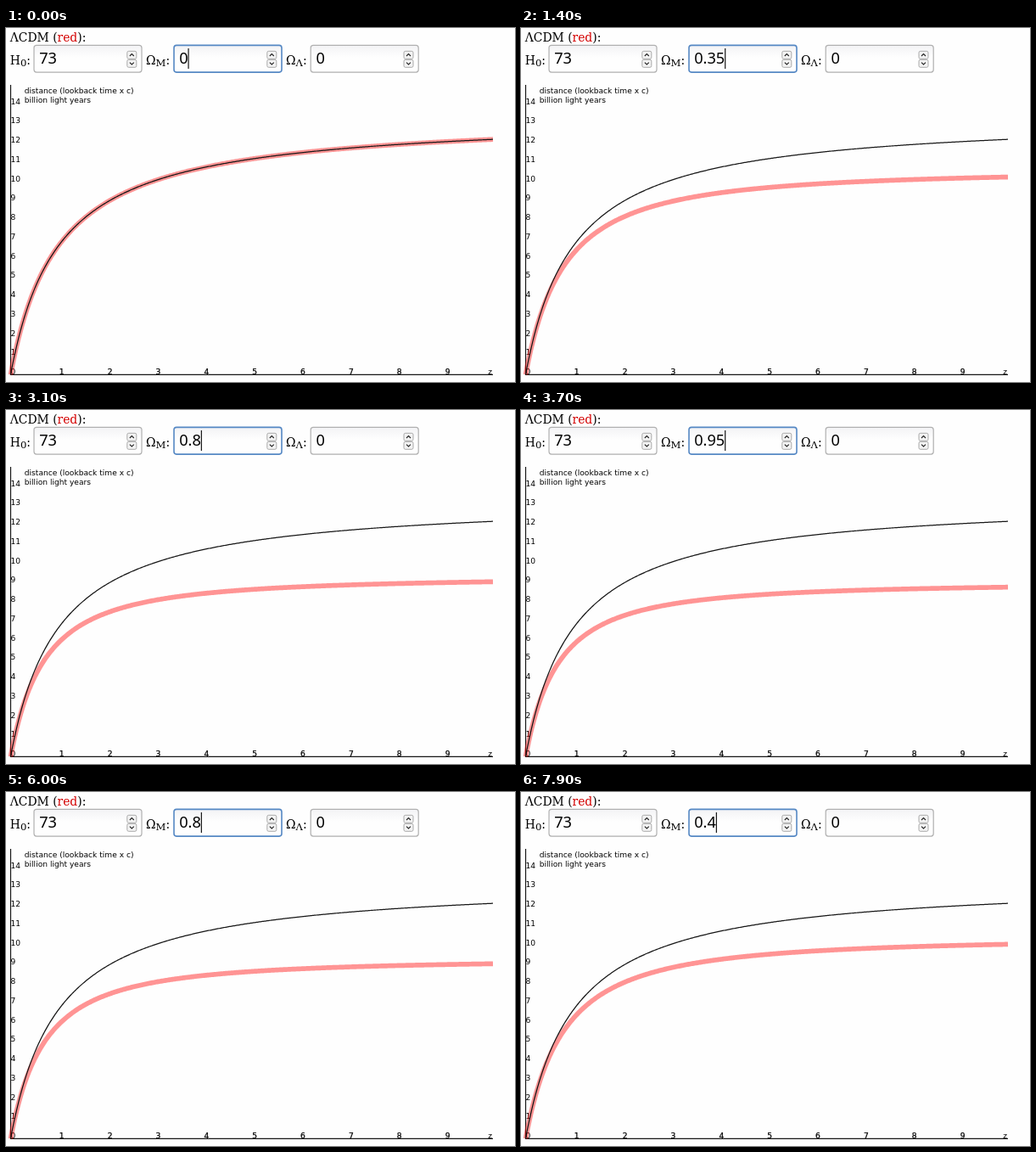
An HTML page for the animation above (8 s loop, 600 by 417 pixels).

```html
<!DOCTYPE html>
<html lang="en">
<head>
<meta charset="utf-8">
<title>Lookback distance</title>
<style>
  html, body { margin: 0; width: 100%; height: 100%; overflow: hidden; background: #fefefe; }
  svg { display: block; width: 100vw; height: 100vh; }
  text { white-space: pre; }
  .label { font: 13.9px "DejaVu Serif", serif; }
  .sub { font-size: 11.6px; }
  .value { font: 18.2px "Noto Sans", "Open Sans", sans-serif; }
  .chart { font: 9.1px "DejaVu Sans", sans-serif; }
  .heavy { stroke: #000; stroke-width: .25px; }
</style>
</head>
<body>
<svg id="stage" viewBox="0 0 600 417">
  <defs>
    <linearGradient id="inset" x2="0" y2="1">
      <stop stop-color="#f3f3f5"/>
      <stop offset=".45" stop-color="#fefefe"/>
    </linearGradient>
  </defs>
</svg>
<script>
const LOOP = 8000, TICK = 100;
const STEP = .05;
const HUBBLE_TIME = 977.8 / 73; // billion years
const X0 = 5.5, Y0 = 408.2, DX = 56.85, DY = 22.75;
const INK = "#161616";

const stage = document.getElementById("stage");

function add(tag, attrs, text, parent = stage) {
  const el = document.createElementNS(stage.namespaceURI, tag);
  for (const key in attrs) el.setAttribute(key, attrs[key]);
  if (text !== undefined) el.textContent = text;
  parent.appendChild(el);
  return el;
}

const write = (x, y, cls, text, fill = "#000") => add("text", { x, y, class: cls, fill }, text);

function symbol(x, main, sub) {
  const el = write(x, 42.5, "label", main);
  add("tspan", { class: "sub", dy: 2 }, sub, el);
  add("tspan", { dy: -2 }, ":", el);
}

function field(x, text, focused) {
  add("rect", {
    x, y: 20.4, width: 127, height: 31.7, rx: 3, fill: "url(#inset)",
    stroke: focused ? "#5588c4" : "#b0b0b0", "stroke-width": focused ? 1.6 : 1.2
  });
  for (const [y, tip] of [[27, -1], [37, 1]]) {
    add("rect", {
      x: x + 109.8, y: y + .3, width: 11, height: 9, rx: 1.8,
      fill: "#f3f3f3", stroke: "#a2a2a2", "stroke-width": .9
    });
    add("path", {
      d: `M${x + 112.8} ${y + 4.8 - tip * 1.2}l2.5 ${tip * 2.4}l2.5 ${-tip * 2.4}`,
      fill: "none", stroke: "#222", "stroke-width": 1.1
    });
  }
  return write(x + 6.2, 42.3, "value", text);
}

// Integrates dz / ((1 + z)^2 sqrt(1 + m z)) for an open universe without dark energy.
function curve(m) {
  const dz = .02;
  let path = `M${X0} ${Y0}`, sum = 0;
  for (let i = 0; i < 500; i++) {
    const z = (i + .5) * dz;
    sum += dz / ((1 + z) ** 2 * Math.sqrt(1 + m * z));
    const x = X0 + (i + 1) * dz * DX;
    const y = Y0 - HUBBLE_TIME * sum * DY;
    path += `L${x.toFixed(2)} ${y.toFixed(2)}`;
  }
  return path;
}

// Counts evenly from one number of clicks to another; a power above 1 slows the pace.
function ramp(t, start, end, from, to, power = 1) {
  const p = Math.min(1, (t - start) / (end - start)) ** (1 / power);
  return from + Math.sign(to - from) * Math.floor(p * Math.abs(to - from) + 1e-6);
}

function clicks(t) {
  if (t < 700) return 0;
  if (t < 1200) return 1;
  if (t < 1500) return ramp(t, 1200, 1400, 3, 7);
  if (t < 3100) return ramp(t, 1500, 2700, 8, 15);
  if (t < 5500) return ramp(t, 3100, 3900, 16, 20);
  return ramp(t, 5500, 7900, 19, 8, 1.4);
}

write(4.8, 16, "label", "ΛCDM (");
write(60.5, 16, "label", "red", "#d40000");
write(84.3, 16, "label", "):");
symbol(4.8, "H", "0");
symbol(165, "Ω", "M");
symbol(330, "Ω", "Λ");
field(33, "73");
const value = field(198, "0", true);
field(359.2, "0");
const caret = add("rect", { y: 24, width: 1.1, height: 24 });

write(21.8, 77, "chart", "distance (lookback time x c)");
write(21.8, 88.4, "chart", "billion light years");
for (let i = 0; i <= 14; i++) write(X0, Y0 - i * DY, "chart", i);
for (let i = 1; i <= 9; i++) write(X0 + .5 + i * DX, Y0, "chart heavy", i);
write(568.3, Y0, "chart", "z");
add("path", { d: "M5.5 67V408.4H574", fill: "none", stroke: INK, "stroke-width": 1.2 });

const red = add("path", { fill: "none", stroke: "#f00", "stroke-opacity": .42, "stroke-width": 5.7 });
add("path", { d: curve(0), fill: "none", stroke: INK, "stroke-width": 1.25 });

let shown = -1;

function render(time) {
  const t = Math.floor(time / TICK) * TICK;
  const count = clicks(t);
  if (count !== shown) {
    shown = count;
    const density = +(count * STEP).toFixed(2);
    value.textContent = density;
    red.setAttribute("d", curve(density));
    caret.setAttribute("x", 204.1 + value.getComputedTextLength());
  }
  caret.setAttribute("visibility", t >= 4900 && t < 5500 ? "hidden" : "visible");
}

const begin = performance.now();
function tick() {
  render((performance.now() - begin) % LOOP);
  requestAnimationFrame(tick);
}
tick();
</script>
</body>
</html>
```
